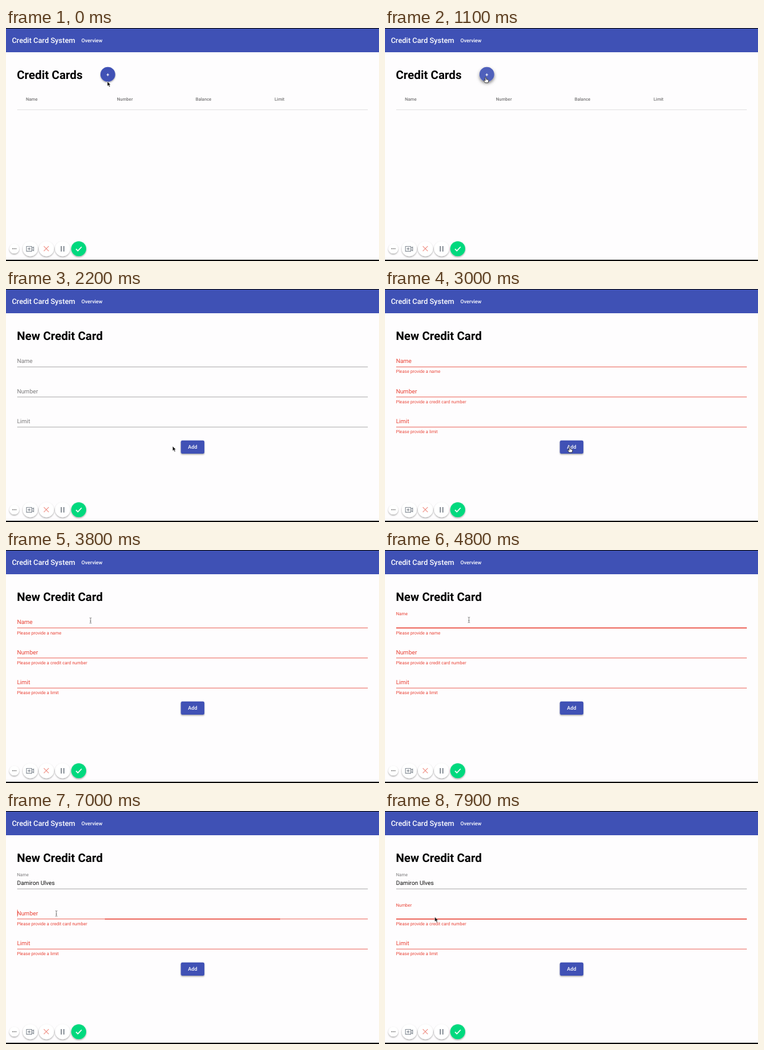
An HTML page for the animation above (8 s loop, 600 by 375 pixels).

```html
<!DOCTYPE html>
<html lang="en">
<head>
<meta charset="utf-8">
<title>Credit Card System</title>
<style>
  html, body { margin: 0; width: 100%; height: 100%; overflow: hidden; background: #fefdfe; }
  svg { display: block; width: 600px; height: 375px; }
  text { font-family: Roboto, Arial, sans-serif; text-rendering: geometricPrecision; white-space: pre; }
</style>
</head>
<body>
<svg id="stage" viewBox="0 0 600 375">
  <defs>
    <filter id="soft" x="-50%" y="-50%" width="200%" height="200%">
      <feDropShadow dx="0" dy="1.3" stdDeviation="1.3" flood-opacity=".38"/>
    </filter>
    <filter id="deep" x="-50%" y="-50%" width="200%" height="200%">
      <feDropShadow dx="0" dy="2.6" stdDeviation="2.4" flood-opacity=".5"/>
    </filter>
  </defs>
  <rect width="600" height="375" fill="#fefdfe"/>
  <rect y="1" width="600" height="38" fill="#3f51b5"/>
  <rect width="600" height="1"/>
  <rect y="373" width="600" height="2"/>
  <g fill="#fff" font-weight="500">
    <text x="9.4" y="24.2" font-size="11.8">Credit Card System</text>
    <text x="121.3" y="23" font-size="8.26">Overview</text>
  </g>
  <g id="page"></g>
  <g id="tools" fill="none" stroke-width="1.2">
    <g filter="url(#soft)" stroke="none" fill="#fff">
      <circle cx="13.3" cy="355.3" r="7.8"/>
      <circle cx="39" cy="355.3" r="12"/>
      <circle cx="65" cy="355.3" r="12"/>
      <circle cx="91" cy="355.3" r="12"/>
      <circle cx="117" cy="355.3" r="12" fill="#00d97e"/>
    </g>
    <path d="M10.2 355.3h1.4M12.7 355.3h1.4M15.2 355.3h1.4" stroke="#666" stroke-width="1.4"/>
    <path d="M33 351.5h8.5v7.8H33zM41.5 354.5l3-2v6l-3-2M35 355.4h4.5M37.25 353.1v4.6" stroke="#8d949c"/>
    <path d="M60.8 351.2l8 8M68.8 351.2l-8 8" stroke="#f0968c"/>
    <path d="M88.9 351v8.8M93.1 351v8.8" stroke="#8d949c" stroke-width="2"/>
    <path d="M112.6 355.6l3 3 6-6.4" stroke="#fff" stroke-width="1.5"/>
  </g>
  <g id="pointer"></g>
</svg>
<script>
const LOOP = 8000, OPEN = 1200, FAIL = 2800, FOCUS_NAME = 4200, TYPE = 5100, FOCUS_NUMBER = 7000;
const NAME = 'Damiron Ulves', BLUE = '#3f51b5', RED = '#e94235', GREY = '#7d7c7d';
const page = document.getElementById('page'), pointer = document.getElementById('pointer');
const pen = document.createElement('canvas').getContext('2d');
pen.font = '94.5px Roboto, Arial, sans-serif';

const clamp = v => Math.min(1, Math.max(0, v));
const easeOut = v => 1 - (1 - clamp(v)) ** 3;
const smooth = v => v * v * (3 - 2 * v);
const text = (x, y, size, fill, str, extra = '') =>
  `<text x="${x}" y="${y}" font-size="${size}" fill="${fill}" ${extra}>${str}</text>`;
const line = (y, color, w, x1 = 18, x2 = 582) =>
  `<path d="M${x1} ${y}H${x2}" stroke="${color}" stroke-width="${w}"/>`;
const heading = str => text(17.5, 81.6, 18.9, '#000', str, 'font-weight="700"');

// time, x, y of the pointer's hot spot
const path = [
  [0, 163, 86], [300, 161.5, 88], [500, 163, 87], [800, 162.5, 80], [1100, 162, 79],
  [1600, 162, 79], [2200, 268, 253], [2500, 297, 254], [3000, 297, 254],
  [3700, 136, 113.5], [3800, 136, 113.5], [4200, 135, 112.5], [6300, 135, 112.5],
  [6800, 82, 164], [7000, 81, 165], [7500, 80, 170.5], [8000, 80, 170.5]
];
function pointerAt(t) {
  const i = path.findIndex(p => p[0] > t);
  const [t0, x0, y0] = path[i - 1], [t1, x1, y1] = path[i];
  const k = smooth((t - t0) / (t1 - t0));
  return [x0 + (x1 - x0) * k, y0 + (y1 - y0) * k];
}

function listPage(t) {
  const fill = t >= 1000 ? '#5061bb' : t >= 700 ? '#4757b8' : BLUE;
  const heads = [['Name', 32], ['Number', 178.5], ['Balance', 305], ['Limit', 432]];
  return heading('Credit Cards') +
    `<circle cx="163.8" cy="74.7" r="11.9" fill="${fill}" filter="url(#${t >= 1000 ? 'deep' : 'soft'})"/>` +
    text(163.8, 77.6, 8.26, '#fff', '+', 'text-anchor="middle" font-weight="700"') +
    heads.map(([s, x]) => text(x, 117.4, 7.08, '#767576', s, 'font-weight="500"')).join('') +
    line(131.6, '#e2e1e2', 1);
}

function field(t, label, y, hint, { focus = Infinity, blur = Infinity, value = '', fixed = false }) {
  const active = t >= focus && t < blur;
  const bad = t >= FAIL && !fixed;
  const color = bad ? RED : active ? BLUE : GREY;
  const k = easeOut((t - focus) / 400);
  let out = text(17.7, y + 3.4 - 14.1 * k, 9.45 - 2.37 * k, color, label);
  out += line(y + 9.5, bad ? RED : '#9b9a9b', 0.8);
  if (active) {
    const half = 282 * (0.5 + 0.5 * easeOut((t - focus) / 300));
    out += line(y + 9.6, color, 1.4, 300 - half, 300 + half);
    const since = t - (value ? TYPE : focus);
    const typing = t >= TYPE && t < TYPE + 1300;
    if (typing && value || since % 1000 < 500) {
      const x = 18.4 + pen.measureText(value).width / 10;
      out += `<path d="M${x} ${y - 5.5}v11" stroke="${color}" stroke-width=".7"/>`;
    }
  }
  out += text(17.7, y + 3.4, 9.45, '#111', value);
  if (bad) {
    const e = easeOut((t - FAIL) / 300);
    out += text(17.7, y + 19.6 - 4 * (1 - e), 7.08, RED, hint, `opacity="${e}"`);
  }
  return out;
}

function formPage(t) {
  const count = t < TYPE ? 0 : Math.floor((t - TYPE) / 90) + 1;
  return heading('New Credit Card') +
    field(t, 'Name', 115.9, 'Please provide a name',
      { focus: FOCUS_NAME, blur: FOCUS_NUMBER, value: NAME.slice(0, count), fixed: count > 0 }) +
    field(t, 'Number', 164.3, 'Please provide a credit card number', { focus: FOCUS_NUMBER }) +
    field(t, 'Limit', 212.7, 'Please provide a limit', {}) +
    `<rect x="281.3" y="243.8" width="37.8" height="21.3" rx="2.4" fill="${BLUE}" filter="url(#soft)"/>` +
    text(300.2, 257.4, 8.26, '#fff', 'Add', 'text-anchor="middle" font-weight="500"');
}

const shapes = {
  arrow: '<path d="M0 0v7.6l1.8-1.6 1.2 2.9 1.4-.6-1.2-2.8h2.3z" fill="#111" stroke="#fff" stroke-width=".5"/>',
  hand: '<path d="M-.9.6Q0-.6.9.6V3.6l3 .7q1 .3.8 1.5L4 9H-.8L-3.4 5.6q.3-1.2 1.5-.4l1 .8z" fill="#fff" stroke="#222" stroke-width=".8"/>',
  beam: '<path d="M-1.6-4.4Q0-4.4 0-3.4V3.4Q0 4.4-1.6 4.4M1.6-4.4Q0-4.4 0-3.4M0 3.4Q0 4.4 1.6 4.4M-1 1h2" fill="none" stroke="#777" stroke-width=".9"/>'
};
function pointerKind(t, x, y) {
  if (t < OPEN) return t >= 700 ? 'hand' : 'arrow';
  if (x > 281 && x < 319 && y > 244 && y < 265) return 'hand';
  return [115.9, 164.3, 212.7].some(c => Math.abs(y - c) < 5.5) ? 'beam' : 'arrow';
}

function draw(t) {
  page.innerHTML = t < OPEN ? listPage(t) : formPage(t);
  const [x, y] = pointerAt(t);
  const hidden = t >= TYPE && t < 6300;
  pointer.innerHTML = hidden ? '' : `<g transform="translate(${x} ${y})">${shapes[pointerKind(t, x, y)]}</g>`;
}

let shown = -1;
function tick() {
  const t = Math.floor(performance.now() % LOOP / 100) * 100;
  if (t !== shown) draw(shown = t);
  requestAnimationFrame(tick);
}
tick();
</script>
</body>
</html>
```
